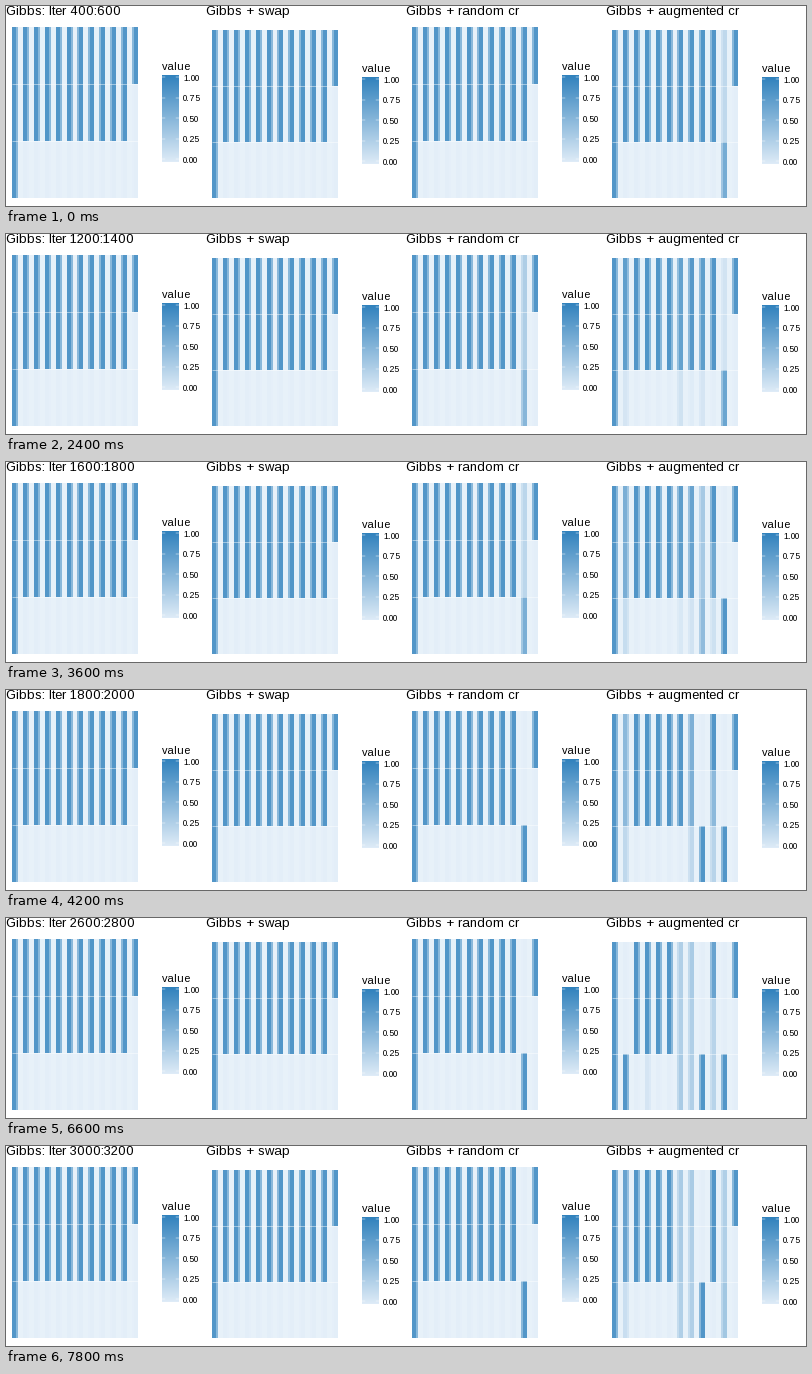
Recreate the animation shown at these times as a matplotlib script. Size 800 by 200 pixels, loop 8000 ms.

```python
import numpy as np
import matplotlib.pyplot as plt
from matplotlib.animation import FuncAnimation

W, H, DPI = 800, 200, 100
STEP_MS, HOLD = 200, 3            # each state is held for three ticks
TICKS = 40
BARS, BAR_W, CORE_W = 12, 6, 4
PERIOD = (126 - BAR_W) / (BARS - 1)
LOW = np.array([222, 235, 247]) / 255
HIGH = np.array([49, 130, 189]) / 255

plt.rcParams["font.family"] = "Liberation Sans"
plt.rcParams["text.hinting_factor"] = 1      # whole-pixel letter spacing
fig = plt.figure(figsize=(W / DPI, H / DPI), dpi=DPI, facecolor="white")
ax = fig.add_axes([0, 0, 1, 1])
ax.axis("off")

# Values of the top, middle and bottom rows at key states, per bar
KEYS = [0, 2, 5, 7, 9, 11, 13]
ON, OFF = (1, 1, 0), (0, 0, 1)
RANDOM = {10: [ON, OFF, (.55, .55, .45), OFF, OFF, OFF, OFF]}
AUGMENTED = {
    1: [ON, ON, (.85, .85, .15), (.6, .6, .25), OFF, OFF, (.85, .85, .18)],
    3: [ON, ON, ON, ON, (1, 1, .1), (1, 1, .1), ON],
    6: [ON, (.9, .9, .12), (.85, .85, .15), ON, ON, (.35, .35, .4), (.4, .4, .35)],
    7: [ON, (.92, .92, .08), ON, (.7, .7, .25), (.7, .7, .15), (.4, .35, .35), (.4, .35, .35)],
    8: [ON, ON, (.85, .85, .15), OFF, OFF, OFF, OFF],
    9: [ON, ON, ON, (1, .6, .3), (1, .35, .45), (.85, .3, .3), ON],
    10: [(.25, .25, .75), (.38, .38, .5), OFF, OFF, OFF, OFF, (.35, .35, .45)],
}


def shade(value, alpha=.84):
    value = np.asarray(value)[..., None]
    return 1 - alpha * (1 - (LOW + value * (HIGH - LOW)))


def grid(changes, state):
    values = np.ones((3, BARS))
    values[1:, -1] = 0
    values[2, 1:] = 0
    for bar, keys in changes.items():
        for row, track in enumerate(zip(*keys)):
            values[row, bar] = np.interp(state, KEYS, track)
    return values


def tile_colors(values):
    """Each bar is a dark core between soft fringes, then a pale gap."""
    colors = np.empty((3, 4 * BARS - 1, 3))
    colors[:, 0::4] = colors[:, 2::4] = shade(.66 * values, .8)
    colors[:, 1::4] = shade(values)
    colors[:, 3::4] = shade(0, .72)
    return colors


def tile_edges(x):
    """The core drifts from the left to the right side of its bar."""
    left = x + PERIOD * np.arange(BARS)
    core = left + np.linspace(0, BAR_W - CORE_W, BARS)
    return np.round(np.stack([left, core, core + CORE_W, left + BAR_W], axis=1).ravel())


def text(x, y, s, px):
    return ax.text(x, y, s, fontsize=px * 72 / DPI, color="black", va="baseline")


def draw_legend(x, top):
    text(x, top - 4.5, "value", 11)
    ramp = np.linspace(1, 0, 87)
    ax.imshow(shade(ramp, 1)[:, None], extent=(x, x + 17, top + 87, top),
              aspect="auto", interpolation="nearest")
    for i in range(5):
        y = top + 2.4 + i * 20.5
        ax.plot([x, x + 3.4], [y, y], color="white", lw=.35)
        ax.plot([x + 13.6, x + 17], [y, y], color="white", lw=.35)
        text(x + 21, y + 3.4, f"{1 - i / 4:.2f}", 8.8)


def draw_panel(x, top, title, changes):
    label = text(x, 9, title, 13.2)
    rows = np.linspace(top, 192, 4)
    mesh = ax.pcolormesh(tile_edges(x + 6), rows, tile_colors(grid(changes, 0)),
                         antialiased=False, linewidth=0)
    for y in rows[1:3] - .5:
        ax.plot([x + 6, x + 132], [y, y], color="white",
                alpha=.45, lw=.72, solid_capstyle="butt")
    draw_legend(x + 156, 69 if top == 21 else 71)
    return label, mesh


title, _ = draw_panel(0, 21, "", {})
draw_panel(200, 24, "Gibbs + swap", {})
_, random_mesh = draw_panel(400, 21, "Gibbs + random cr", RANDOM)
_, augmented_mesh = draw_panel(600, 24, "Gibbs + augmented cr", AUGMENTED)
ax.set_xlim(0, W)
ax.set_ylim(H, 0)


def update(tick):
    state = tick // HOLD
    start = 400 + 200 * state
    title.set_text(f"Gibbs: Iter {start}:{start + 200}")
    random_mesh.set_array(tile_colors(grid(RANDOM, state)))
    augmented_mesh.set_array(tile_colors(grid(AUGMENTED, state)))
    return title, random_mesh, augmented_mesh


anim = FuncAnimation(fig, update, frames=TICKS, interval=STEP_MS,
                     repeat=True, repeat_delay=0, blit=False)
plt.show()
```
